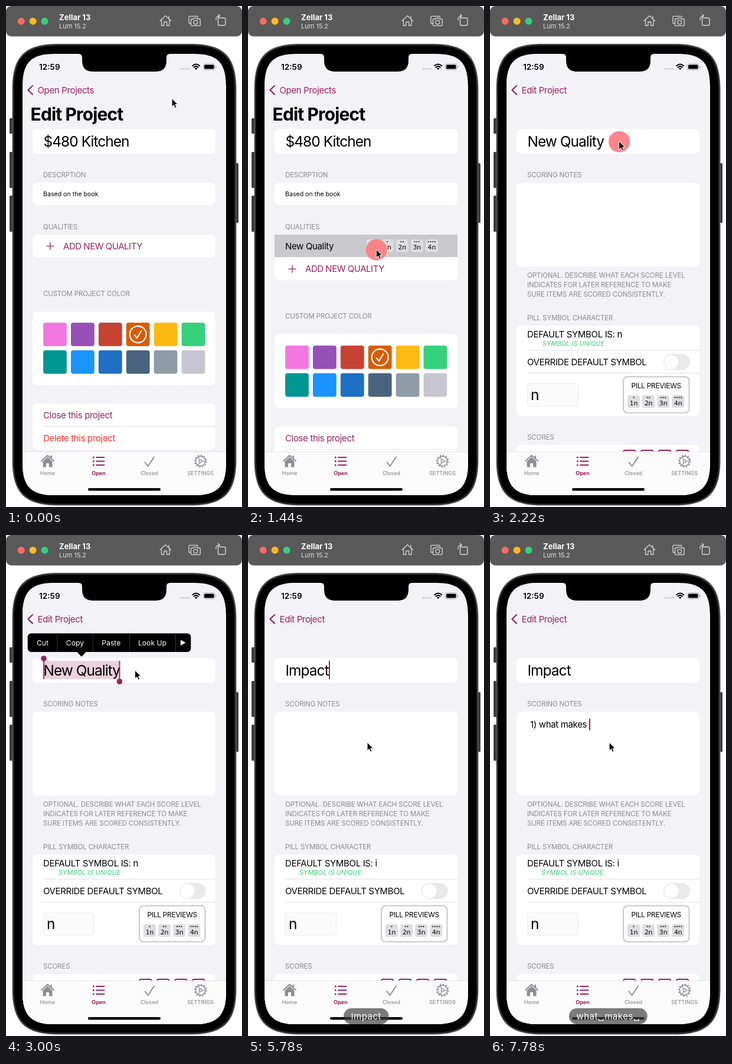
Write an HTML page that moves like this. It is 400x848 px and loops after 8 s.

```html
<!DOCTYPE html>
<html lang="en">
<head>
<meta charset="utf-8">
<style>
html, body { margin: 0; width: 100%; height: 100%; overflow: hidden; background: #fff; }
svg { display: block; }
text { font-family: Inter, "Liberation Sans", sans-serif; white-space: pre; }
.body { font-size: 15px; letter-spacing: -.023em; }
.caps { font-size: 15px; letter-spacing: -.031em; }
.big { font-size: 24.5px; letter-spacing: -.04em; }
.head { font-size: 11.5px; letter-spacing: -.012em; fill: #8a8a8e; }
.mono { font: 11.5px "Noto Sans Mono", monospace; text-anchor: middle; }
.tab { font-size: 9px; font-weight: 500; text-anchor: middle; }
.mid { text-anchor: middle; }
.key { font-size: 15px; letter-spacing: .5px; fill: #fff; }
.line { fill: none; stroke-linecap: round; stroke-linejoin: round; }
</style>
</head>
<body>
<svg id="stage" width="400" height="848" viewBox="0 0 400 848"></svg>
<script>
const ACCENT = '#99205f', GRAY = '#8e8e93', BG = '#f2f2f7';
const $ = id => document.getElementById(id);

const text = (x, y, cls, str, extra = '') => `<text x="${x}" y="${y}" class="${cls}" ${extra}>${str}</text>`;
const rect = (x, y, w, h, r, fill, extra = '') =>
  `<rect x="${x}" y="${y}" width="${w}" height="${h}" rx="${r}" fill="${fill}" ${extra}/>`;
const card = (y1, y2) => rect(45, y1, 310, y2 - y1, 8, '#fff');
const dot = (x, y, r, fill, extra = '') => `<circle cx="${x}" cy="${y}" r="${r}" fill="${fill}" ${extra}/>`;
const line = (d, color, w, extra = '') => `<path d="${d}" class="line" stroke="${color}" stroke-width="${w}" ${extra}/>`;
const rule = y => rect(63, y, 292, 1, 0, '#e1e1e4');
const group = (id, inner, extra = '') => `<g id="${id}" ${extra}>${inner}</g>`;

// Box with continuous corners: longer and softer than a circular arc
function squircle(x, y, w, h, r, fill) {
  const e = 1.3 * r, c = e * .732, m = e - c;
  return `<path fill="${fill}" d="M${x + e} ${y} h${w - 2 * e} c${c} 0 ${e} ${m} ${e} ${e}
    v${h - 2 * e} c0 ${c} ${-m} ${e} ${-e} ${e} h${2 * e - w} c${-c} 0 ${-e} ${-m} ${-e} ${-e}
    v${2 * e - h} c0 ${-c} ${m} ${-e} ${e} ${-e} z"/>`;
}

// Score pill: a digit, a letter and as many dots on top
function score(x, y, n) {
  let dots = '';
  for (let i = 0; i < n; i++) dots += dot(x + 10.5 + (i - (n - 1) / 2) * 3.6, y + 4, 1.1, '#222');
  return rect(x, y, 21, 21.5, 4, '#dedee0') + dots + text(x + 10.5, y + 17, 'mono', n + 'n');
}
const scores = (x, y, from) => [0, 1, 2, 3, 4].slice(from).map((n, i) => score(x + i * 25.1, y, n)).join('');

function swatches() {
  const colors = ['#f277e0', '#9750b7', '#c64233', '#d85c00', '#fdb912', '#36d17b',
    '#009692', '#1a94ff', '#1f6fc5', '#48637b', '#8f9ca8', '#c6c5d1'];
  const pitch = 46.9, size = 39.8;
  return colors.map((c, i) =>
    rect(63.1 + i % 6 * pitch, 535.9 + (i > 5 ? pitch : 0), size, size, 4, c)).join('') +
    dot(223.7, 555.8, 14, 'none', 'stroke="#fff" stroke-width="2.2"') +
    line('M217.7 557 L222 562 L229.3 550.2', '#fff', 2.1);
}

const projectPage = () =>
  rect(28, 81, 345, 747, 0, BG) +
  card(208, 250) + text(63.5, 238, 'big', '$480 Kitchen') +
  text(63, 290, 'head', 'DESCRPTION') + card(299, 337) +
  text(63, 322, '', 'Based on the book', 'font-size="10.6"') +
  text(63, 378, 'head', 'QUALITIES') +
  group('qualityCard', rect(45, 387, 310, 38.5, 8, '#fff', 'id="qualityBox"') +
    group('row', '<path id="rowHit" d="M45 387 H355 V425 H45 Z" fill="#c9c9cd"/>' +
      text(63, 411.5, 'body', 'New Quality') + scores(200.5, 395, 0) +
      line('M331 402 L335.5 406.3 L331 410.6', '#c4c4c7', 1.7))) +
  group('below',
    '<path id="addHit" d="M45 386 H355 V417 Q355 425 347 425 H53 Q45 425 45 417 Z" fill="#d4d3d8"/>' +
    line('M69 406.3 H81 M75 400.3 V412.3', ACCENT, 1.3) +
    text(97, 411.5, 'caps', 'ADD NEW QUALITY', `fill="${ACCENT}"`) +
    text(63, 490.5, 'head', 'CUSTOM PROJECT COLOR') + card(517, 642) + swatches() +
    card(673, 751) + text(63, 698, 'body', 'Close this project', `fill="${ACCENT}"`) + rule(711) +
    text(63, 737, 'body', 'Delete this project', 'fill="#f5352f"')) +
  rect(28, 81, 345, 747, 0, '#000', 'id="dim"');

const qualityPage = () =>
  rect(28, 81, 345, 747, 0, BG) + card(208, 250) +
  group('selection', rect(64, 213, 129, 31, 0, '#ead1dc')) +
  text(63.5, 238, 'big', '', 'id="name"') +
  group('handles', rect(63.2, 209, 1.8, 35, 0, ACCENT) + dot(64, 209, 4.8, ACCENT) +
    rect(191.6, 213, 1.8, 35, 0, ACCENT) + dot(192.4, 248, 4.8, ACCENT)) +
  text(63, 290, 'head', 'SCORING NOTES') + card(299, 441) +
  text(68, 325.5, 'body', '', 'id="notes"') +
  text(63, 459.5, 'head', 'OPTIONAL. DESCRIBE WHAT EACH SCORE LEVEL') +
  text(63, 475.5, 'head', 'INDICATES FOR LATER REFERENCE TO MAKE') +
  text(63, 491.5, 'head', 'SURE ITEMS ARE SCORED CONSISTENTLY.') +
  text(63, 532, 'head', 'PILL SYMBOL CHARACTER') + card(541, 694) +
  text(63, 560.5, 'body', '', 'id="symbol"') +
  text(89, 575, '', 'SYMBOL IS UNIQUE', 'id="unique" font-size="11" font-style="italic" fill="#35cf7b"') +
  rule(582) + text(63, 608, 'body', 'OVERRIDE DEFAULT SYMBOL') +
  rect(294, 589, 45, 27, 13.5, '#e9e9eb') + dot(307.5, 602.5, 12, '#fff') + rule(621) +
  rect(63.5, 639, 86, 38.5, 4, '#fafafa', 'stroke="#ececee"') + text(69, 667, 'big', 'n') +
  rect(226, 627.5, 111.5, 61, 7, '#fff', 'stroke="#c8c8cb" stroke-width="2"') +
  text(281.7, 647, 'mid', 'PILL PREVIEWS', 'font-size="11.8" letter-spacing="-.2"') + scores(233, 658.7, 1) +
  text(63, 734, 'head', 'SCORES') + card(743, 840) +
  [226, 256, 286, 316].map(x => rect(x, 752, 20.5, 20, 3, 'none', `stroke="${ACCENT}" stroke-width="2"`)).join('') +
  rect(0, 213, 2, 31, 0, ACCENT, 'id="caret"');

const statusBar = () =>
  text(56, 108, '', '12:59', 'font-size="13.6" font-weight="600"') +
  [297, 301.3, 305.6, 309.9].map(x => dot(x, 106.3, 1.4, '#c3c3c8')).join('') +
  line('M316.3 101.3 Q322.2 95.8 328.1 101.3 M318.6 103.8 Q322.2 100.5 325.8 103.8', '#000', 2, 'stroke-linecap="butt"') +
  '<path d="M319.8 105.6 Q322.2 103.7 324.6 105.6 L322.2 108.2 Z"/>' +
  rect(334.5, 98, 19.5, 10, 3, 'none', 'stroke="#aaa"') + rect(336, 99.5, 16.5, 7, 1.6, '#000') +
  rect(355.2, 101.3, 1.3, 3.4, .6, '#aaa');

const navBar = () =>
  line('M45 135 L37.3 142.3 L45 149.6', ACCENT, 2.2) +
  text(53.5, 147.5, 'body', 'Open Projects', `id="backOld" fill="${ACCENT}"`) +
  group('title', text(0, 0, '', 'Edit Project', 'id="titleBold" font-size="30" font-weight="700" letter-spacing="-.88"') +
    text(0, 0, '', 'Edit Project', `id="titleThin" font-size="31" letter-spacing="-.75" fill="${ACCENT}"`));

function tabBar() {
  const gear = dot(329.7, 770.5, 8.2, 'none', `stroke="${GRAY}" stroke-width="1.4"`) +
    dot(329.7, 770.5, 9.8, 'none', `stroke="${GRAY}" stroke-width="2" stroke-dasharray="2.4 2.73"`) +
    dot(329.7, 770.5, 2.4, 'none', `stroke="${GRAY}" stroke-width="1.2"`) +
    line('M332.2 770.5 H337.5 M328.5 768.4 L325.8 763.6 M328.5 772.6 L325.8 777.4', GRAY, 1.2);
  const list = [764, 770.5, 777].map(y => dot(148.3, y, 1.5, ACCENT) + line(`M153 ${y} H166.5`, ACCENT, 1.9)).join('');
  const house = line('M60 770 L70.5 760.8 L81 770', GRAY, 2) +
    `<path d="M62.5 770.5 L70.5 763.5 L78.5 770.5 V780.5 H73 V774 H68 V780.5 H62.5 Z M75.5 761 H78 V766 L75.5 764 Z" fill="${GRAY}"/>`;
  const labels = [['Home', 70.5], ['Open', 157], ['Closed', 243], ['SETTINGS', 329.6]].map(([s, x], i) =>
    text(x, 794, 'tab', s, i === 1 ? `fill="${ACCENT}" style="font-weight:700"` : `fill="${GRAY}"`)).join('');
  return rect(28, 754, 345, 74, 0, '#fbfbfb', 'opacity=".985"') + rect(28, 754, 345, .6, 0, '#d5d5d8') +
    house + list + line('M235.5 772.5 L240.7 779 L251 763.5', GRAY, 2) + gear + labels +
    rect(139, 816, 123, 4.6, 2.3, '#000');
}

const menu = () =>
  rect(36.7, 166.5, 276.6, 31.5, 6, '#000') + '<path d="M120 197.5 H136 L128 206 Z"/>' +
  [['Cut', 62], ['Copy', 117], ['Paste', 178.3], ['Look Up', 248]].map(([s, x]) =>
    text(x, 186.5, 'mid', s, 'font-size="12.2" fill="#fff"')).join('') +
  [86.5, 147, 209.3, 287].map(x => rect(x, 166.5, .8, 31.5, 0, '#444')).join('') +
  '<path d="M296 177.5 L304.5 182.3 L296 187 Z" fill="#fff"/>';

const toolbar = () =>
  rect(0, 0, 400, 51.5, 9, '#5a5a5a') +
  dot(25.7, 25.8, 6, '#fe6a64') + dot(45.6, 25.8, 6, '#fdb924') + dot(65.5, 25.8, 6, '#36d17b') +
  text(90, 23.7, '', 'Zellar 13', 'font-size="13" font-weight="700" fill="#fff"') +
  text(90, 37.7, '', 'Lum 15.2', 'font-size="11" fill="#dcdcdc"') +
  line('M261 25.3 L270.3 16.5 L279.6 25.3 M263.5 23.5 V33 H268 V27 H272.6 V33 H277 V23.5 M276 17.5 V21', '#d6d6d6', 1.3) +
  line('M312.5 29.5 H311 Q310 29.5 310 28.5 V18.5 Q310 17.3 311.2 17.3 H324 Q325.5 17.3 325.5 19', '#d6d6d6', 1.3) +
  line('M314.8 22 H317.5 L318.5 20.3 H323.5 L324.5 22 H328 Q329.3 22 329.3 23.3 V32 Q329.3 33.3 328 33.3 H314.8 Q313.5 33.3 313.5 32 V23.3 Q313.5 22 314.8 22 Z', '#d6d6d6', 1.3) +
  dot(321.3, 27.5, 3.4, 'none', 'stroke="#d6d6d6" stroke-width="1.3"') +
  rect(359.5, 20.3, 12.5, 12.5, 2, 'none', 'stroke="#d6d6d6" stroke-width="1.4"') +
  line('M356 23.5 Q355.5 17 362 16.8 M359.5 14.3 L362.3 16.8 L359.5 19.3', '#d6d6d6', 1.3);

const phone = () =>
  [[190, 26], [247, 61], [321, 61]].map(([y, h]) => rect(6, y, 6, h, 1.5, '#3c3c3c')).join('') +
  rect(388, 266, 6, 101, 1.5, '#3c3c3c') +
  squircle(10.5, 64, 380, 781.5, 60, '#555') + squircle(12, 65.5, 377, 778.5, 58.5, '#262626') +
  squircle(14, 67.5, 373, 774.5, 56.5, '#000');

const notch = '<path d="M123 80 V81 Q129 81 129 87 V92 C129 105 135 111 148 111 H253 C266 111 272 105 272 92 V87 Q272 81 278 81 V80 Z"/>';

$('stage').innerHTML =
  `<clipPath id="screen">${squircle(28, 81, 345, 747, 42, '#000')}</clipPath>` + toolbar() + phone() +
  group('', group('project', projectPage()) + group('quality', qualityPage()) + statusBar() + navBar() +
    tabBar() + group('menu', menu()) + notch, 'clip-path="url(#screen)"') +
  [0, 1, 2].map(i => group('key' + i, rect(0, 801, 0, 27, 13.5, '#404040', 'opacity=".68"') + text(200, 820, 'key', ''))).join('') +
  dot(0, 0, 0, '#ff8084', 'id="tap" opacity=".95"') +
  '<path id="pointer" d="M0 0 V14 L3.3 11 L5.6 16.2 L8 15.1 L5.7 10.1 H10 Z" stroke="#fff" stroke-width="1"/>';

// Tables are in ticks of 1/9 s: [tick, value, ...]
const TICKS = 72;
const pointer = [[1, 281.5, 156.5], [2, 279, 168], [3, 262, 220], [4, 222, 325], [5, 192, 395], [6, 184, 410],
  [10, 184, 410], [12, 210, 413], [14, 225.5, 411], [15, 225.5, 411], [16, 228, 385], [17, 228, 302],
  [18, 224, 260], [20, 219, 229], [43, 219, 229], [44, 211, 290], [45, 202.5, 351]];
const tap = [[5, 0], [6, 18], [8, 18], [9, 9], [10, 0], [12, 0], [13, 18], [14, 18], [15, 8], [16, 0],
  [19, 0], [20, 18], [21, 8], [22, 18], [24, 18], [25, 10.5], [26, 5], [27, 0], [44, 0], [45, 18], [46, 10], [47, 4], [48, 0]];
const insert = [[6, 0], [7, .5], [8, 1]];
const addPress = [[5, 0], [6, 1], [8, 1], [9, .5], [10, 0]];
const push = [[13, 0], [14, .47], [15, .858], [16, .97], [17, 1]];
const blink = [[46, 1], [49, 0], [50, 0], [52, 1], [60, 1], [61, .45], [62, 1]];
const nameSteps = [[0, 'New Quality'], [39, 'I'], [40, 'Im'], [41, 'Imp'], [42, 'Impac'], [43, 'Impact']];
const noteSteps = [[0, ''], [54, '1'], [56, '1)'], [58, '1) '], [62, '1) w'], [63, '1) wh'], [64, '1) what'],
  [65, '1) what '], [66, '1) what m'], [67, '1) what mak'], [68, '1) what makes'], [69, '1) what makes ']];
// Key overlays, lowest first
const keySteps = [[0], [39, 'I'], [40, 'Im'], [41, 'Imp'], [42, 'Impac'], [43, 'Impact'], [53], [54, '1'], [56, '1)'],
  [58, '⇧␣', '1)'], [62, 'w', '⇧␣', '1)'], [63, 'wh', '⇧␣', '1)'], [64, 'what', '⇧␣'], [65, 'what␣', '⇧␣'],
  [66, 'what␣m', '⇧␣'], [67, 'what␣mak', '⇧␣'], [68, 'what␣makes␣', '⇧␣'], [69, 'what␣makes␣']];

const last = (table, k) => table.filter(row => row[0] <= k).pop();
const mix = (a, b, p) => a + (b - a) * p;
function at(table, k, col = 1) {
  const a = last(table, k) || table[0], b = table.find(row => row[0] > k);
  return b && a !== b ? mix(a[col], b[col], (k - a[0]) / (b[0] - a[0])) : a[col];
}
const set = (id, attrs) => { for (const n in attrs) $(id).setAttribute(n, attrs[n]); };
const show = (id, on) => set(id, { opacity: +on });
const move = (id, x, y, s = 1) => set(id, { transform: `translate(${x} ${y}) scale(${s})` });
const ADD_H = 38.8;

function draw(k) {
  const px = at(pointer, k), py = at(pointer, k, 2);
  move('pointer', px - .4, py);
  set('tap', { cx: px, cy: py + .7, r: at(tap, k) });

  const ins = at(insert, k), p = at(push, k);
  set('qualityBox', { height: 38.5 + ADD_H * ins });
  show('row', ins);
  move('below', 0, ADD_H * ins);
  set('addHit', { opacity: at(addPress, k) });
  show('rowHit', k >= 13);

  move('project', -103.5 * p, 0);
  set('dim', { opacity: .075 * p });
  move('quality', 345 * (1 - p), 0);
  set('backOld', { opacity: Math.max(0, 1 - 2 * p) });
  const q = p ** 1.2;
  move('title', mix(41.6, 53.5, q), mix(193.5, 147.5, q), mix(1, .484, q));
  set('titleBold', { opacity: Math.max(0, 1 - p * 1.6) });
  set('titleThin', { opacity: Math.min(1, p * 1.15) });

  const typing = k >= 39, inNotes = k >= 53;
  $('name').textContent = last(nameSteps, k)[1];
  $('notes').textContent = last(noteSteps, k)[1];
  $('symbol').textContent = 'DEFAULT SYMBOL IS: ' + (typing ? 'i' : 'n');
  set('unique', { x: typing ? 87 : 89 });
  const selected = k >= 22 && !typing;
  show('selection', selected);
  show('handles', selected);
  show('menu', k >= 24 && !typing);

  const field = $(inNotes ? 'notes' : 'name');
  const end = +field.getAttribute('x') + field.getComputedTextLength();
  set('caret', { x: end + (inNotes ? 0 : .3), y: inNotes ? 311 : 213, height: inNotes ? 19.5 : 31,
    opacity: typing ? at(blink, k) : 0 });

  const keys = last(keySteps, k).slice(1);
  for (let i = 0; i < 3; i++) {
    const g = $('key' + i), [box, label] = g.children;
    show('key' + i, i < keys.length);
    move('key' + i, 0, -34 * i);
    label.textContent = keys[i] || '';
    const w = label.getComputedTextLength();
    label.setAttribute('x', 200.3 - w / 2);
    box.setAttribute('x', 200.3 - w / 2 - 12.5);
    box.setAttribute('width', w + 25);
  }
}

const start = performance.now();
function frame() {
  const t = (performance.now() - start) % 8000;
  draw(Math.min(TICKS - 1, Math.floor((t + 8) * 9 / 1000)));
  requestAnimationFrame(frame);
}
frame();
</script>
</body>
</html>
```
